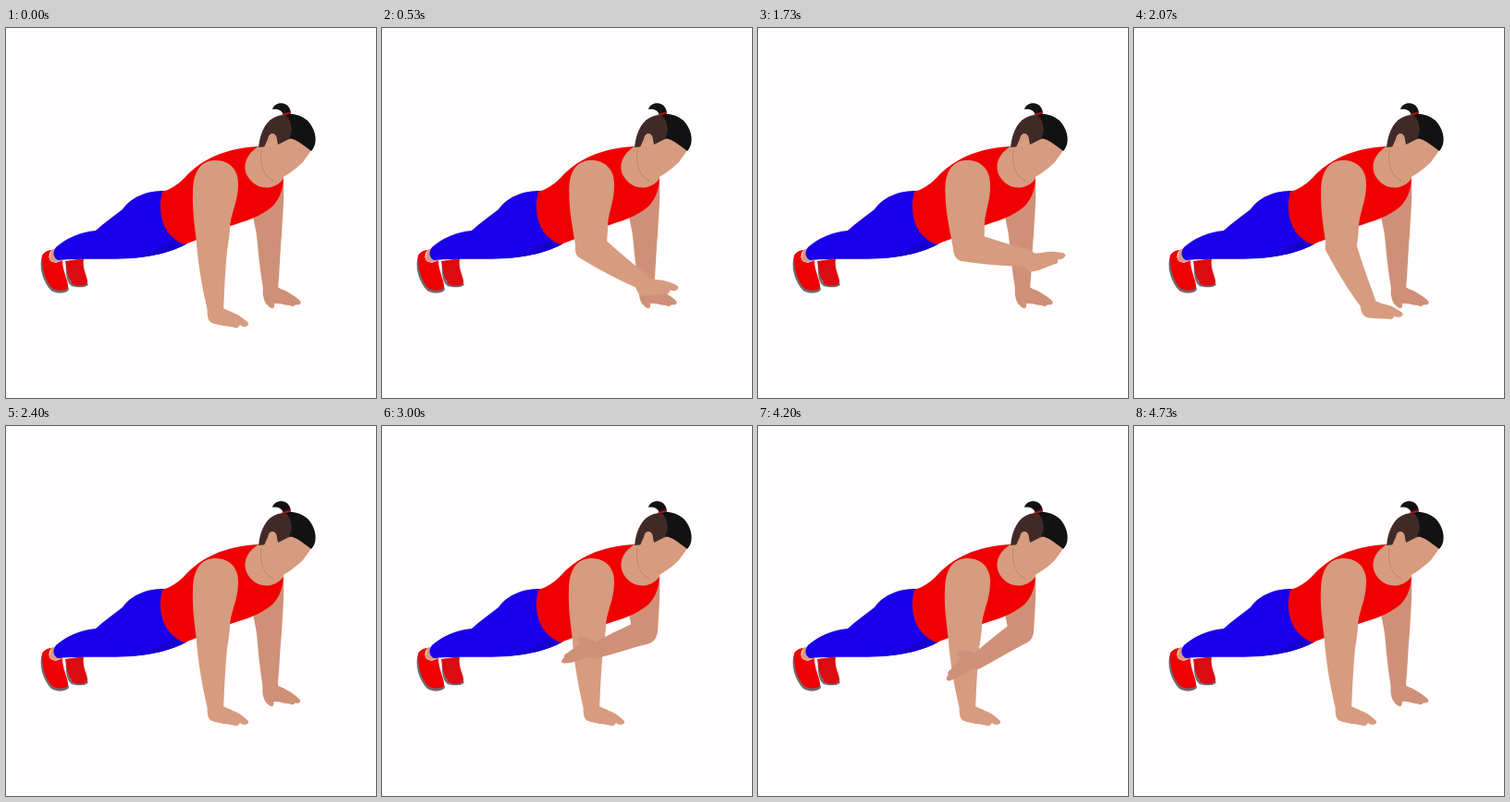
An HTML page that plays this animation: 400 px wide and 400 px high, repeating every 4.8 s.

```html
<!DOCTYPE html>
<html lang="en">
<head>
<meta charset="utf-8">
<title>Push-up arm taps</title>
<style>
  html, body { margin: 0; width: 100%; height: 100%; overflow: hidden; background: #fffdfe; }
  svg { display: block; width: 100vw; height: 100vh; }
  .red { fill: #f00000; }
  .sole { fill: #6d6a70; }
  .skin { fill: #d79b80; }
  .far { fill: #cf9078; }
  .hair { fill: #131213; }
</style>
</head>
<body>
<svg viewBox="0 0 400 400">
  <!-- far upper arm -->
  <path class="far" d="M262 180 L300 160 C301 185 299 205 298 223 C295 237 275 238 271 225 C270 216 268 210 267 202Z"/>

  <!-- shoes and ankle -->
  <path class="sole" d="M39 246 C35 258 40 275 49 284 C57 288 65 287 68 283 L67 279 L52 280Z"/>
  <path class="red" d="M39 246 C41 242 46 240 49 240 C45 246 46 252 51 253 C55 255 58 252 61 251 C61 264 68 273 67 281 C62 285 56 284 51 282 C43 275 39 263 39 246Z"/>
  <path class="sole" d="M65 254 C64 266 66 276 71 279 C78 281 87 281 89 277 L86 274 L70 275Z"/>
  <path fill="#dc0c12" d="M64 252 L84 249 C82 262 89 269 88 276 C83 280 77 279 72 277 C68 272 66 265 64 252Z"/>
  <path class="skin" d="M49 240 L56 237 L61 251 C57 253 48 255 47 249Z"/>

  <!-- trousers -->
  <path fill="#1a00ea" d="M171 176 C154 176 137 181 126 196 C117 203 107 210 97 219 C81 220 64 228 54 237 C50 243 51 248 56 251 C90 248 125 252 152 247 C172 244 187 238 196 233Z"/>
  <path fill="#1600d0" d="M138 248.500 C156 243 170 236 182 229 L195 233.500 C180 242 160 247 138 248.500Z"/>

  <!-- vest -->
  <path class="red" d="M169 177 C179 174 186 169 193 162 C210 143 235 130 273 128 L300 163 C299 174 297 183 289 192 C276 204 258 209 241 214.500 C225 222 209 228 193 234 C180 229 171 219 168 204 C166 192 167 185 169 177Z"/>

  <!-- neck and head -->
  <path class="skin" d="M273 128 C260 136 255 149 261 160 C269 174 288 178 300 163 L298 130 L282 122Z"/>
  <path class="skin" d="M277 130 C274 146 278 161 289 165 C298 164 313 153 321 145 L331 131 L310 108 L286 112Z"/>
  <path fill="none" stroke="#c58569" stroke-width="1" d="M276 132 C274 148 279 161 289 165"/>
  <path fill="#402a28" d="M273 129 C275 112 281 99 294 95 L304 93 L318 102 L312 119 C304 119 299 125 293 126 L284 128Z"/>
  <path class="hair" d="M302 93 C315 92 326 97 331 107 C336 116 336 127 330 133 C323 128 316 121 306 119 C311 111 309 102 302 93Z"/>
  <ellipse class="skin" cx="288" cy="121" rx="5" ry="7"/>
  <path class="skin" d="M279 129 L283 120 L293 121 L295 131Z"/>
  <path class="hair" d="M288 88 C290 80 302 79 306 86 C308 89 308 91 307 94 L300 95 C299 89 294 87 288 88Z"/>
  <path fill="none" stroke="#a5170f" stroke-width="2.2" stroke-linecap="round" d="M299.500 94 L307 91.500"/>

  <g id="arms">
    <g id="nearArm" class="skin">
      <path d="M226 143 C242 143 252 154 251 170 C251 188 242 202 242 218 C241 229 240 235 239 238 C234 255 210 252 207 239 C204 215 201 195 202 178 C202 158 209 143 226 143Z"/>
      <g id="nearFore">
        <path d="M206 234 C207 219 237 217 240 232 C238 250 237 265 236 285 L235 306 C230 313 220 312 218 306 C213 285 209 265 206 234Z"/>
        <path id="nearHand" d="M218 303 C217 310 218 317 223 319 C231 322 240 322 248 324 C251 325 252 322 253 321 C256 324 261 323 262 321 C263 318 258 316 255 313 C249 308 242 307 235 303 C230 297 221 297 218 303Z"/>
      </g>
    </g>
    <g id="farFore" class="far">
      <path d="M271 223 C269 205 299 204 298 223 C296 245 296 262 294 282 C292 290 280 290 278 282 C275 263 273 248 271 223Z"/>
      <path id="farHand" d="M278 280 C277 290 279 297 284 301 C287 304 291 304 290 298 C296 297 301 300 307 300 C311 302 313 300 313 299 C317 300 320 298 318 295 C314 291 308 287 302 284 C299 282 297 283 294 280 C291 274 281 274 278 280Z"/>
    </g>
  </g>
</svg>
<script>
  const LOOP = 4800, TAP = 2400, FAR_START = 2362;
  const el = id => document.getElementById(id);
  const [arms, nearArm, nearFore, nearHand, farFore, farHand] =
    ["arms", "nearArm", "nearFore", "nearHand", "farFore", "farHand"].map(el);

  // One smooth lift and return, 0 to 1 to 0
  const lift = t => t < 0 || t > TAP ? 0 : Math.sin(Math.PI * t / TAP) ** 2;
  const turn = (node, angle, x, y) =>
    node.setAttribute("transform", `rotate(${angle.toFixed(2)} ${x} ${y})`);
  const bend = (p, full) => Math.min(1, p / full);

  let front = null;
  function draw(t) {
    const near = lift(t), far = lift(t - FAR_START);
    turn(nearArm, -6 * near, 227, 170);
    turn(nearFore, -123 * near, 222, 237);
    turn(nearHand, 46 * bend(near, 0.5), 226, 305);
    turn(farFore, 128 * far, 284, 222);
    turn(farHand, 64 * bend(far, 0.4), 286, 281);

    const top = t < TAP ? nearArm : farFore;
    if (top !== front) arms.appendChild(front = top);
  }

  const start = performance.now();
  function tick() {
    draw((performance.now() - start) % LOOP);
    requestAnimationFrame(tick);
  }
  draw(0);
  requestAnimationFrame(tick);
</script>
</body>
</html>
```
